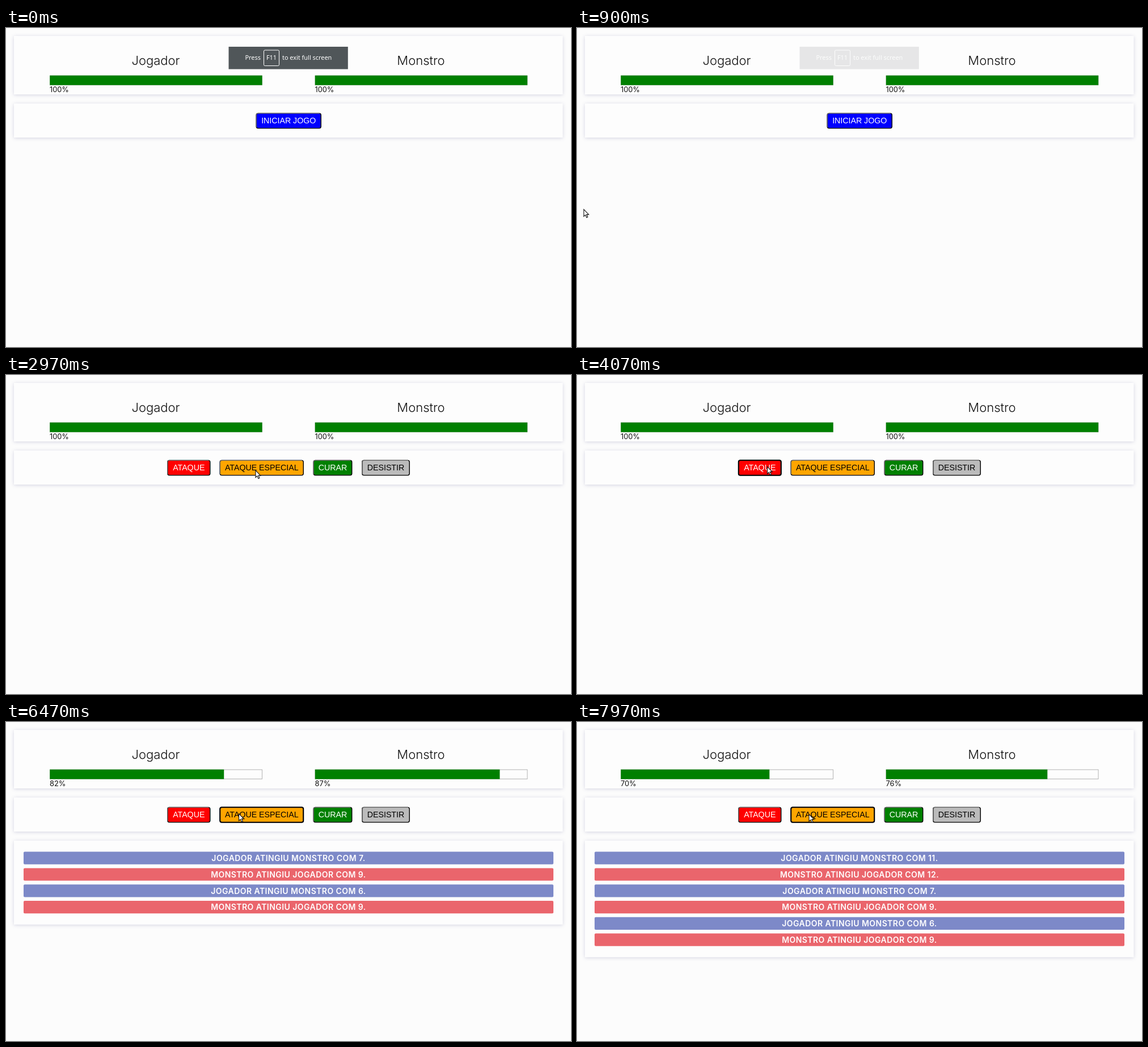
An HTML page that plays this animation: 996 px wide and 562 px high, repeating every 8000 ms.

```html
<!DOCTYPE html>
<html lang="pt">
<head>
<meta charset="utf-8">
<style>
  html, body { margin: 0; height: 100%; overflow: hidden; background: #fcfcfc; }
  svg { display: block; width: 100vw; height: 100vh; font-family: Inter, sans-serif; }
  .panel { fill: #fdfdfd; filter: drop-shadow(0 1px 3px rgba(50, 50, 120, .2)); }
  .title { font-size: 22px; font-weight: 300; text-anchor: middle; fill: #111; }
  .percent { font-size: 12.8px; fill: #111; }
  .button { font: 14.2px "Liberation Sans", Arial, sans-serif; text-anchor: middle; }
  .log { font-size: 14px; font-weight: 600; letter-spacing: .45px; text-anchor: middle; fill: #fff; }
  .toast { font: 10.9px "Noto Sans", sans-serif; fill: #fff; }
</style>
</head>
<body>
<svg viewBox="0 0 996 562" id="stage"></svg>
<script>
const LOOP = 8000;
const stage = document.getElementById('stage');

function add(parent, tag, attrs, text) {
  const el = document.createElementNS('http://www.w3.org/2000/svg', tag);
  for (const key in attrs) el.setAttribute(key, attrs[key]);
  if (text) el.textContent = text;
  return parent.appendChild(el);
}
const rect = (parent, x, y, width, height, attrs) => add(parent, 'rect', { x, y, width, height, ...attrs });
const label = (parent, x, y, cls, text, attrs) => add(parent, 'text', { x, y, class: cls, ...attrs }, text);
const panel = (y, height) => rect(stage, 14, y, 967.5, height, { class: 'panel' });
const show = (el, on) => el.setAttribute('visibility', on ? 'visible' : 'hidden');

function makeBar(x, name) {
  label(stage, x + 187, 64.5, 'title', name);
  rect(stage, x + .5, 84, 374, 16.3, { fill: 'none', stroke: '#aaa', 'stroke-width': .9 });
  const fill = rect(stage, x + .3, 83.7, 374, 16.9, { fill: 'green' });
  const percent = label(stage, x, 112.8, 'percent', '100%');
  return life => {
    fill.setAttribute('width', 374.3 * life / 100);
    percent.textContent = life + '%';
  };
}

function makeButton(left, right, fill, color, text, focusStart, focusEnd) {
  const g = add(stage, 'g');
  const x = left + .75, w = right - left - 1.5;
  rect(g, x, 150.4, w, 26.2, { rx: 3, fill, stroke: '#000', 'stroke-width': 1.4 });
  const bevel = add(g, 'path', {
    d: `M${x} 175V153.4q0-3 3-3H${right - 3}`, fill: 'none', stroke: '#666', 'stroke-width': 1.4
  });
  const ring = rect(g, x, 150.3, w, 26.4, { rx: 3, fill: 'none', stroke: '#000', 'stroke-width': 2 });
  label(g, (left + right) / 2, 168, 'button', text, { fill: color });
  return (t, on) => {
    const focused = t >= focusStart && t < focusEnd;
    show(g, on);
    show(ring, on && focused);
    show(bevel, on && !focused);
  };
}

panel(14, 103);
panel(133, 60);
const logPanel = panel(209, 0);
const setPlayer = makeBar(77, 'Jogador');
const setMonster = makeBar(544.5, 'Monstro');

const START = 2570;
const startButton = makeButton(440.5, 556, '#00f', '#fff', 'INICIAR JOGO', 2470, START);
const gameButtons = [
  makeButton(284, 360.5, '#f00', '#fff', 'ATAQUE', 4050, 6440),
  makeButton(376.5, 525, 'orange', '#000', 'ATAQUE ESPECIAL', 6440, LOOP),
  makeButton(541.5, 610.5, 'green', '#fff', 'CURAR'),
  makeButton(627, 712, '#bbb', '#000', 'DESISTIR')
];

const rounds = [
  { time: 4130, dealt: 6, taken: 9 },
  { time: 5290, dealt: 7, taken: 9 },
  { time: 6570, dealt: 11, taken: 12 }
];

function logRow(parent, y, fill, text) {
  rect(parent, 31, y, 934, 22.2, { rx: 2, fill });
  label(parent, 498, y + 16.4, 'log', text);
}
for (const round of rounds) {
  round.rows = add(stage, 'g');
  logRow(round.rows, 228.6, '#7d89c8', `JOGADOR ATINGIU MONSTRO COM ${round.dealt}.`);
  logRow(round.rows, 257.4, '#ea656c', `MONSTRO ATINGIU JOGADOR COM ${round.taken}.`);
}

const toast = add(stage, 'g');
rect(toast, 392.5, 33, 210.3, 39.5, { fill: '#505659' });
rect(toast, 454.5, 39, 27, 27.5, { rx: 2, fill: 'none', stroke: '#fff' });
label(toast, 421.5, 56.4, 'toast', 'Press');
label(toast, 468, 56.4, 'toast', 'F11', { 'text-anchor': 'middle' });
label(toast, 487, 56.4, 'toast', 'to exit full screen');

const cursor = add(stage, 'path', {
  d: 'M0 0V12.4L2.8 9.8 4.9 14.4 6.9 13.5 4.9 9.1H8.7Z', fill: '#fff', stroke: '#111', 'stroke-width': 1.1
});
// time, x, y of the pointer tip
const path = [
  [860, 12, 319.5], [930, 12, 319.5], [1250, 350, 224], [1650, 553, 190], [1930, 549, 180.5],
  [2070, 542, 153], [2300, 527, 161], [2650, 527, 161], [2970, 440, 168], [3270, 440, 168],
  [3850, 335.5, 161.5], [5650, 335.5, 161.5], [6250, 410.5, 161.5], [6970, 410.5, 161.5], [7800, 409, 162.5]
];
function pointerAt(t) {
  const i = path.findIndex(point => point[0] > t);
  if (i < 0) return path[path.length - 1].slice(1);
  if (i === 0) return path[0].slice(1);
  const [t0, x0, y0] = path[i - 1], [t1, x1, y1] = path[i];
  const p = (t - t0) / (t1 - t0), k = p * p * (3 - 2 * p);
  return [x0 + (x1 - x0) * k, y0 + (y1 - y0) * k];
}

function draw(t) {
  toast.setAttribute('opacity', Math.max(0, Math.min(1, (970 - t) / 540)));
  startButton(t, t < START);
  gameButtons.forEach(button => button(t, t >= START));

  const played = rounds.filter(round => t >= round.time);
  let player = 100, monster = 100;
  rounds.forEach((round, i) => {
    const on = i < played.length;
    show(round.rows, on);
    if (!on) return;
    player -= round.taken;
    monster -= round.dealt;
    round.rows.setAttribute('transform', `translate(0 ${57.6 * (played.length - 1 - i)})`);
  });
  setPlayer(player);
  setMonster(monster);
  show(logPanel, played.length > 0);
  logPanel.setAttribute('height', 32.6 + 57.6 * played.length);

  show(cursor, t >= path[0][0]);
  cursor.setAttribute('transform', `translate(${pointerAt(t)})`);
}

function tick() {
  draw(performance.now() % LOOP);
  requestAnimationFrame(tick);
}
tick();
</script>
</body>
</html>
```
